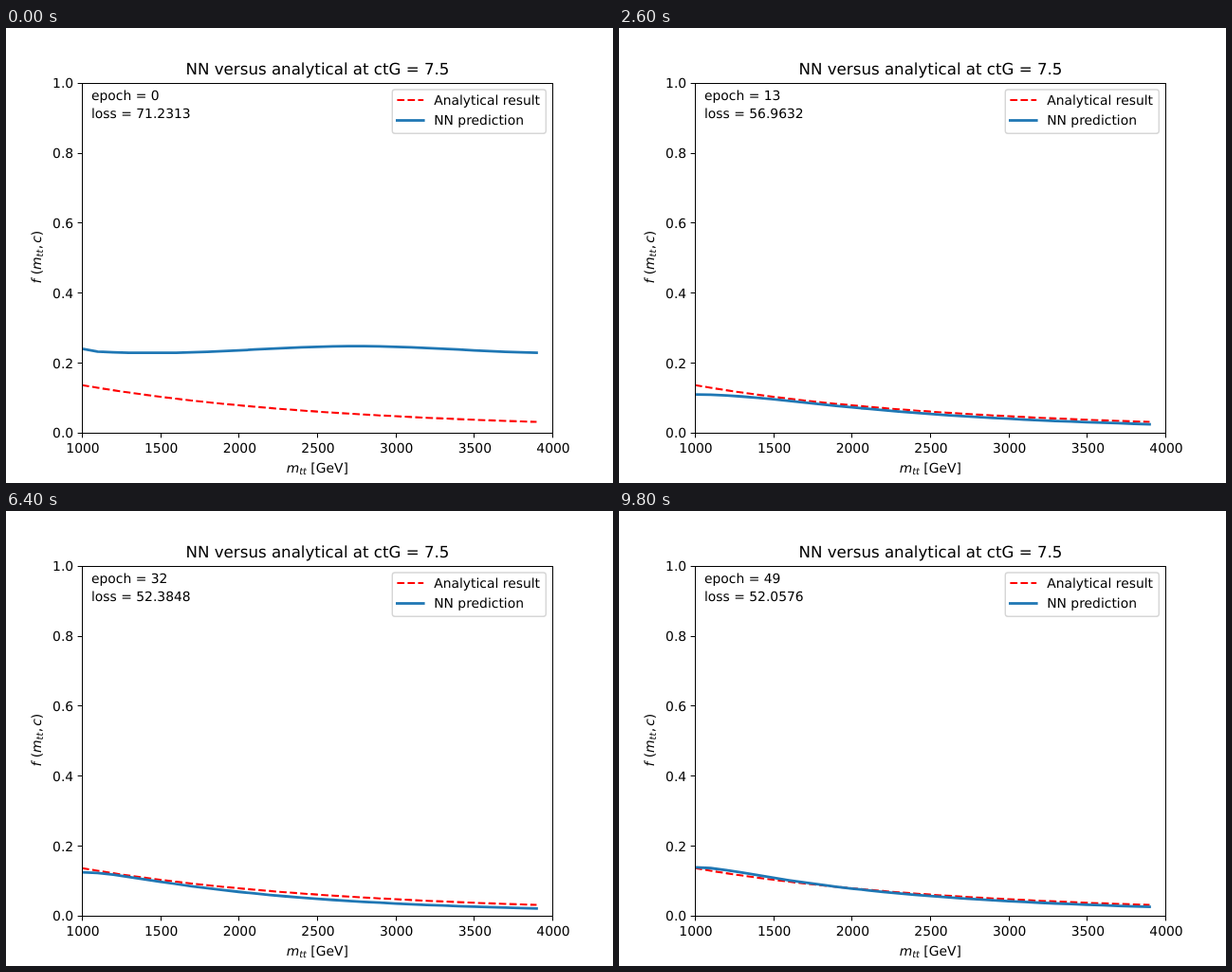
An HTML page for the animation above (10 s loop, 640x480 px).

```html
<!DOCTYPE html>
<html lang="en">
<head>
<meta charset="utf-8">
<title>Network fit during training</title>
<style>
  html, body { margin: 0; width: 100%; height: 100%; overflow: hidden; background: #fff; }
  svg { display: block; width: 640px; height: 480px; }
  text { font: 13.889px "DejaVu Sans", sans-serif; text-rendering: geometricPrecision; white-space: pre; }
  .title { font-size: 16.667px; }
  .middle { text-anchor: middle; }
  .end { text-anchor: end; }
  .var { font-style: italic; }
  .sub { font-style: italic; font-size: 9.722px; }
  .axis { fill: none; stroke: #000; }
  .exact { fill: none; stroke: #f00; stroke-width: 2.083; stroke-dasharray: 7.708 3.333; stroke-linejoin: round; }
  .fit { fill: none; stroke: #1f77b4; stroke-width: 2.778; stroke-linecap: square; stroke-linejoin: round; }
</style>
</head>
<body>
<svg viewBox="0 0 640 480">
  <clipPath id="plot"><rect x="80" y="57.6" width="496" height="369.6"/></clipPath>
  <g clip-path="url(#plot)">
    <path id="exact" class="exact"/>
    <path id="fit" class="fit"/>
  </g>
  <path id="ticks" class="axis"/>
  <rect class="axis" x="80.5" y="58.5" width="496" height="369"/>
  <g id="labels"></g>

  <text class="title middle" x="328.5" y="49">NN versus analytical at ctG = 7.5</text>
  <text class="middle" x="328.3" y="469"><tspan class="var">m</tspan><tspan class="sub" dy="2.2">tt</tspan><tspan dy="-2.2"> [GeV]</tspan></text>
  <text class="middle" transform="translate(37 241.7) rotate(-90)"><tspan class="var">f</tspan> (<tspan class="var">m</tspan><tspan class="sub" dy="2.2">tt</tspan><tspan dx=".5" dy="-2.2">,</tspan><tspan class="var" dx="2">c</tspan>)</text>
  <text id="epoch" x="90" y="76"></text>
  <text id="loss" x="90" y="95"></text>

  <rect x="407.3" y="65" width="162" height="46.3" rx="2.8" fill="#fff" fill-opacity=".8" stroke="#ccc" stroke-opacity=".8" stroke-width="1.389"/>
  <path class="exact" d="M412.4 76h27.8"/>
  <path class="fit" d="M412.4 97.5h27.8"/>
  <text x="451.2" y="81">Analytical result</text>
  <text x="451.2" y="102">NN prediction</text>
</svg>
<script>
const EPOCHS = 50, EPOCH_MS = 200;
const { exp, cos, hypot, round } = Math;
const el = id => document.getElementById(id);
const px = mass => 80 + (mass - 1000) * 496 / 3000;
const py = value => 427.2 - value * 369.6;

// Polyline of f(u), where u is the mass above 1000 in thousands
function curve(f) {
  const points = Array.from({ length: 30 }, (_, i) =>
    `${px(1000 + 100 * i).toFixed(2)} ${py(f(i / 10)).toFixed(2)}`);
  return "M" + points.join("L");
}

const analytical = u => 0.1365 * exp(-0.569 * u + 0.0218 * u * u);

// The level settles like a damped spring while the curve steepens
// and the flat part on the left shrinks; the initial ripple fades out.
function prediction(epoch) {
  const level = 0.135 + 0.1337 * exp(-0.068 * epoch) * cos(0.1 * epoch + 0.744);
  const steepness = (1 - exp(-0.15 * epoch)) * (1.24 - 0.0049 * epoch);
  const plateau = 0.2 + 1.6 * exp(-0.109 * epoch);
  const ripple = exp(-epoch / 3);
  return u => {
    const decay = steepness * (0.75 - 0.045 * u) * (hypot(u, plateau) - plateau);
    const wave = 0.02 - 0.041 * cos(2.417 * (u - 0.45)) + 0.028 * exp(-30 * u);
    return level * exp(-decay) * (1 + ripple * wave);
  };
}

// Key points of the loss: [epoch, value]
const lossKeys = [[0, 71.2313], [9, 60.0674], [17, 53.859], [25, 52.0509],
  [32, 52.3848], [42, 52.1049], [49, 52.0576]];

function lossAt(epoch) {
  const next = lossKeys.findIndex(([e]) => e > epoch);
  if (next < 0) return lossKeys.at(-1)[1];
  const [e0, v0] = lossKeys[next - 1], [e1, v1] = lossKeys[next];
  return v0 + (v1 - v0) * (epoch - e0) / (e1 - e0);
}

function drawAxes() {
  let ticks = "", labels = "";
  for (let mass = 1000; mass <= 4000; mass += 500) {
    ticks += `M${round(px(mass)) + 0.5} 427.5v4.86`;
    labels += `<text class="middle" x="${px(mass) + 1}" y="448">${mass}</text>`;
  }
  for (let value = 0; value <= 10; value += 2) {
    const y = py(value / 10);
    ticks += `M80.5 ${round(y) + 0.5}h-4.86`;
    labels += `<text class="end" x="71.2" y="${round(y + 5.27)}">${(value / 10).toFixed(1)}</text>`;
  }
  el("ticks").setAttribute("d", ticks);
  el("labels").innerHTML = labels;
  el("exact").setAttribute("d", curve(analytical));
}

function draw() {
  const epoch = Math.floor(performance.now() / EPOCH_MS) % EPOCHS;
  el("epoch").textContent = `epoch = ${epoch}`;
  el("loss").textContent = `loss = ${lossAt(epoch).toFixed(4)}`;
  el("fit").setAttribute("d", curve(prediction(epoch)));
  requestAnimationFrame(draw);
}

drawAxes();
draw();
</script>
</body>
</html>
```
